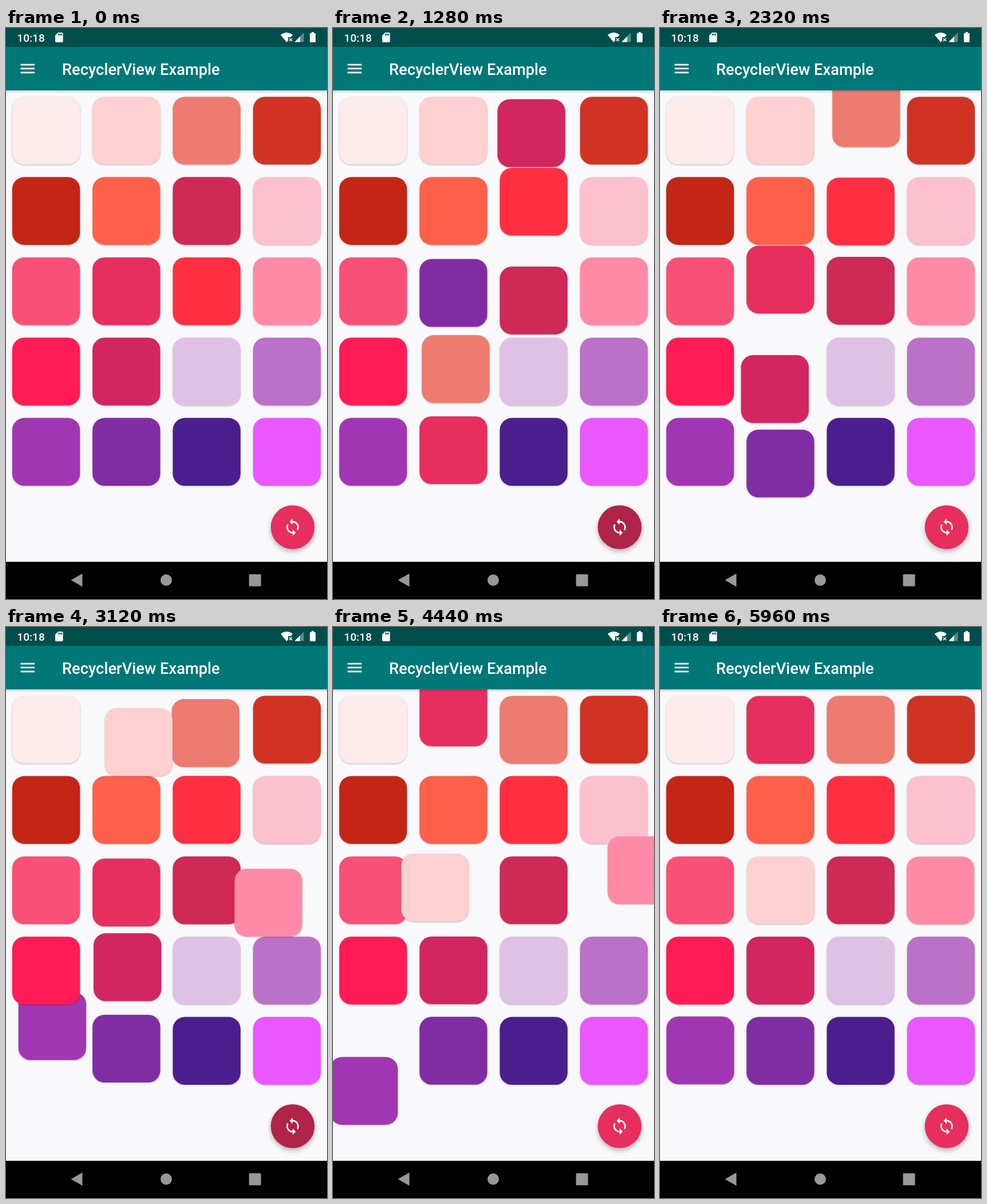
An HTML page with a canvas for the animation above (6000 ms loop, 561 by 998 pixels).

```html
<!DOCTYPE html>
<html lang="en">
<head>
<meta charset="utf-8">
<title>RecyclerView Example</title>
<style>
  html, body { margin: 0; width: 100%; height: 100%; overflow: hidden; background: #f9f8fa; }
  canvas, svg { position: absolute; left: 0; top: 0; display: block; }
  text { font-family: Roboto, "Open Sans", sans-serif; font-weight: 500; fill: #fff; }
  .fab { filter: drop-shadow(0 4px 4px rgba(0, 0, 0, .28)); }
</style>
</head>
<body>
<canvas id="grid" width="561" height="998"></canvas>
<svg width="561" height="998" viewBox="0 0 561 998">
  <defs>
    <linearGradient id="shade" x2="0" y2="1">
      <stop offset="0" stop-color="#000" stop-opacity=".16"/>
      <stop offset="1" stop-color="#000" stop-opacity="0"/>
    </linearGradient>
  </defs>

  <rect y="109" width="561" height="5" fill="url(#shade)"/>
  <rect width="561" height="33" fill="#004e4b"/>
  <rect y="33" width="561" height="76" fill="#007777"/>

  <!-- status bar -->
  <text x="19.3" y="24" font-size="19.1">10:18</text>
  <g fill="#fff">
    <path transform="translate(82.6 6.3) scale(.85)" d="M18 2h-8L4 8v12c0 1.1.9 2 2 2h12c1.1 0 2-.9 2-2V4c0-1.1-.9-2-2-2zm-6 6h-2V4h2zm3 0h-2V4h2zm3 0h-2V4h2z"/>
    <path d="M480 12Q490.500 4 501 12L497.500 16H493V22L490.500 25Z"/>
    <path d="M495 18l5 5m0-5l-5 5" stroke="#fff" stroke-width="1.6"/>
    <path d="M504.500 24.500L520.500 8V24.500Z" opacity=".35"/>
    <path d="M504.500 24.500L514 14.700V24.500Z"/>
    <path d="M534 7h4v2h2q1 0 1 1v14q0 1-1 1h-8q-1 0-1-1V10q0-1 1-1h2z"/>
  </g>

  <!-- app bar -->
  <path transform="translate(21.4 54.6) scale(1.363)" fill="#fff" d="M3 18h18v-2H3zm0-5h18v-2H3zm0-7v2h18V6z"/>
  <text x="98" y="81.500" font-size="27.3">RecyclerView Example</text>

  <!-- floating button -->
  <circle class="fab" cx="501" cy="872.500" r="38.300" fill="#e62f5e"/>
  <circle id="ripple" cx="501" cy="872.500" r="38.300" opacity="0"/>
  <path transform="translate(484.6 856.1) scale(1.363)" fill="#fff" d="M12 4V1L8 5l4 4V6c3.310 0 6 2.690 6 6 0 1.010-.25 1.970-.7 2.800l1.460 1.460C19.540 15.030 20 13.570 20 12c0-4.420-3.580-8-8-8zm0 14c-3.310 0-6-2.690-6-6 0-1.010.25-1.970.7-2.800L5.240 7.740C4.460 8.970 4 10.430 4 12c0 4.420 3.580 8 8 8v3l4-4-4-4z"/>

  <!-- navigation bar -->
  <rect y="933" width="561" height="65"/>
  <g fill="#9b9697">
    <path d="M113.500 965L133.500 953.500V976.500Z"/>
    <circle cx="280" cy="965" r="10"/>
    <rect x="424.700" y="954.700" width="21" height="21" rx="1.5"/>
  </g>
</svg>
<script>
const LOOP = 6000;
const SIZE = 118.4, RADIUS = 21;
const COLORS = `fdeaea ffd0d0 ed7b70 d03324 c32616 ff604b ce2957 fcc0cf f95077 e62f5e
  ff2f41 ff8aa8 ff1b55 d12660 dfc1e6 bc71c8 a136b2 802da4 4b1e8d ea57ff`.split(/\s+/);

// Each tap sends tiles (by home index) to new cells.
const TAPS = [
  { at: 240, moves: { 2: 13, 13: 2, 9: 17, 17: 9, 6: 10, 10: 6 } },
  { at: 1144, moves: { 2: 2, 13: 13, 9: 9, 17: 17 } },
  { at: 3024, moves: { 16: 1, 1: 11, 11: 16 } },
  { at: 3779, moves: { 9: 1, 1: 9, 11: 11, 16: 16 } }
];

const cellX = i => 10.9 + 140.3 * (i % 4);
const cellY = i => 120.2 + 140.35 * Math.floor(i / 4);
const clamp = v => Math.max(0, Math.min(1, v));

// Step response of a spring with damping ratio 0.5.
function spring(ms) {
  if (ms <= 0) return 0;
  const a = ms * 0.00378, k = 1 / Math.sqrt(3);
  return 1 - Math.exp(-k * a) * (Math.cos(a) + k * Math.sin(a));
}

const tiles = COLORS.map((color, home) => ({
  color: "#" + color,
  home,
  moves: TAPS.filter(tap => home in tap.moves)
    .map(tap => ({ at: tap.at, cell: tap.moves[home] }))
}));

// Horizontal motion keeps its speed when retargeted; vertical motion restarts from rest.
function place(tile, t) {
  let cell = tile.home, x = cellX(cell), y = cellY(cell);
  let yAt = () => y;
  for (const { at, cell: next } of tile.moves) {
    if (t < at) break;
    x += (cellX(next) - cellX(cell)) * spring(t - at);
    const from = yAt(at), to = cellY(next);
    yAt = time => from + (to - from) * spring(time - at);
    cell = next;
  }
  return { color: tile.color, cell, x, y: yAt(t) };
}

const ctx = document.getElementById("grid").getContext("2d");
const ripple = document.getElementById("ripple");

function drawTiles(t) {
  ctx.clearRect(0, 0, 561, 998);
  ctx.shadowColor = "rgba(0,0,0,.26)";
  ctx.shadowBlur = 2.5;
  ctx.shadowOffsetY = 1;
  const placed = tiles.map(tile => place(tile, t)).sort((a, b) => a.cell - b.cell);
  for (const { color, x, y } of placed) {
    ctx.fillStyle = color;
    ctx.beginPath();
    ctx.roundRect(x, y, SIZE, SIZE, RADIUS);
    ctx.fill();
  }
}

function drawRipple(t) {
  let alpha = 0, grow = 0;
  for (const { at } of TAPS) {
    const dt = t - at;
    if (dt < -90 || dt > 330) continue;
    alpha = 0.24 * clamp((dt + 90) / 70) * clamp((330 - dt) / 180);
    grow = clamp((dt + 90) / 150);
  }
  ripple.setAttribute("opacity", alpha);
  ripple.setAttribute("r", 38.3 * (0.4 + 0.6 * grow));
}

const start = performance.now();
function frame() {
  const t = (performance.now() - start) % LOOP;
  drawTiles(t);
  drawRipple(t);
  requestAnimationFrame(frame);
}
frame();
</script>
</body>
</html>
```
